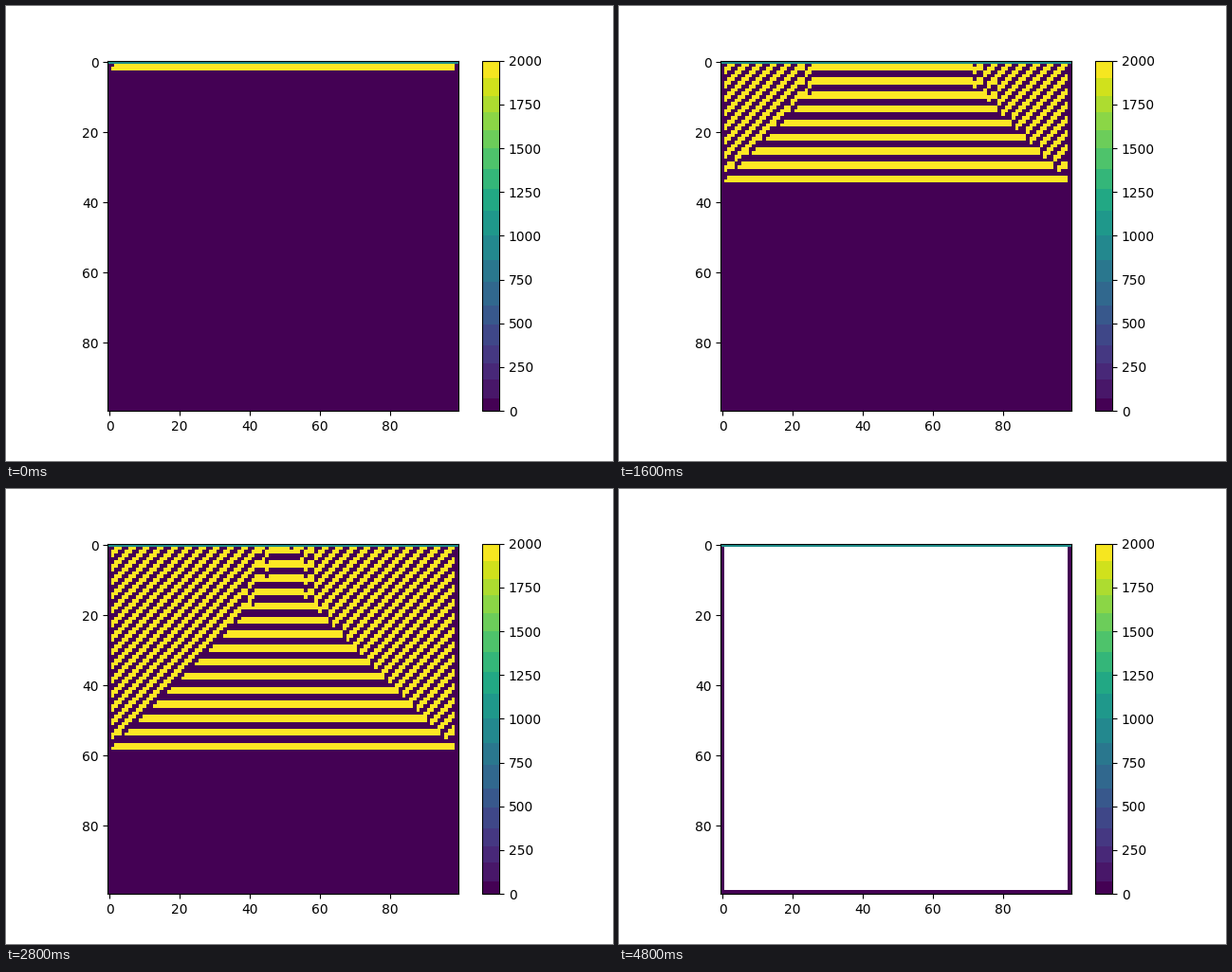
A matplotlib script that plays this animation: 640x480 px, repeating every 5 s.

```python
import numpy as np
import matplotlib.pyplot as plt
from matplotlib.animation import FuncAnimation
from matplotlib.colors import ListedColormap

SIZE = 100       # cells per side
FRAMES = 100
RATE = 5300.0    # far beyond the stable step, so the field blows up
TOP = 1000.0
VMAX = 2000.0


def step(u):
    """Advance advection along both axes with central differences."""
    new = u.copy()
    down = u[:-2, 1:-1] - u[2:, 1:-1]
    right = u[1:-1, :-2] - u[1:-1, 2:]
    new[1:-1, 1:-1] += RATE * down + RATE * right
    return new


def simulate():
    u = np.zeros((SIZE, SIZE))
    u[0] = TOP
    u = step(u)
    fields = []
    with np.errstate(all="ignore"):
        for _ in range(FRAMES):
            u = step(u)
            shown = np.where(np.isfinite(u), u, np.nan)
            fields.append(np.clip(shown, 0, VMAX))
    return fields


def banded_viridis():
    """Viridis in flat bands, each with the colour of its middle."""
    top, bottom = 57.6, 427.2
    edges = [58, 75, 94, 112, 131, 150, 172, 193, 217, 242, 268, 292,
             316, 337, 359, 377, 395, 415, 427]
    levels = np.sort((bottom - np.array(edges)) / (bottom - top))
    middles = (levels[:-1] + levels[1:]) / 2
    middles[0], middles[-1] = 0, 0.985
    at = np.linspace(0, 1, 256)
    band = np.clip(np.digitize(at, levels) - 1, 0, len(middles) - 1)
    return ListedColormap(plt.get_cmap("viridis")(middles[band]))


fields = simulate()
fig, ax = plt.subplots(figsize=(6.4, 4.8), dpi=100)
image = ax.imshow(fields[0], cmap="viridis", vmin=0, vmax=VMAX,
                  interpolation="nearest")
bar = fig.colorbar(image, ax=ax)
bar.solids.set_cmap(banded_viridis())


def update(frame):
    image.set_data(fields[frame])
    return [image]


anim = FuncAnimation(fig, update, frames=FRAMES, interval=50,
                     repeat=True, repeat_delay=0)
plt.show()
```
